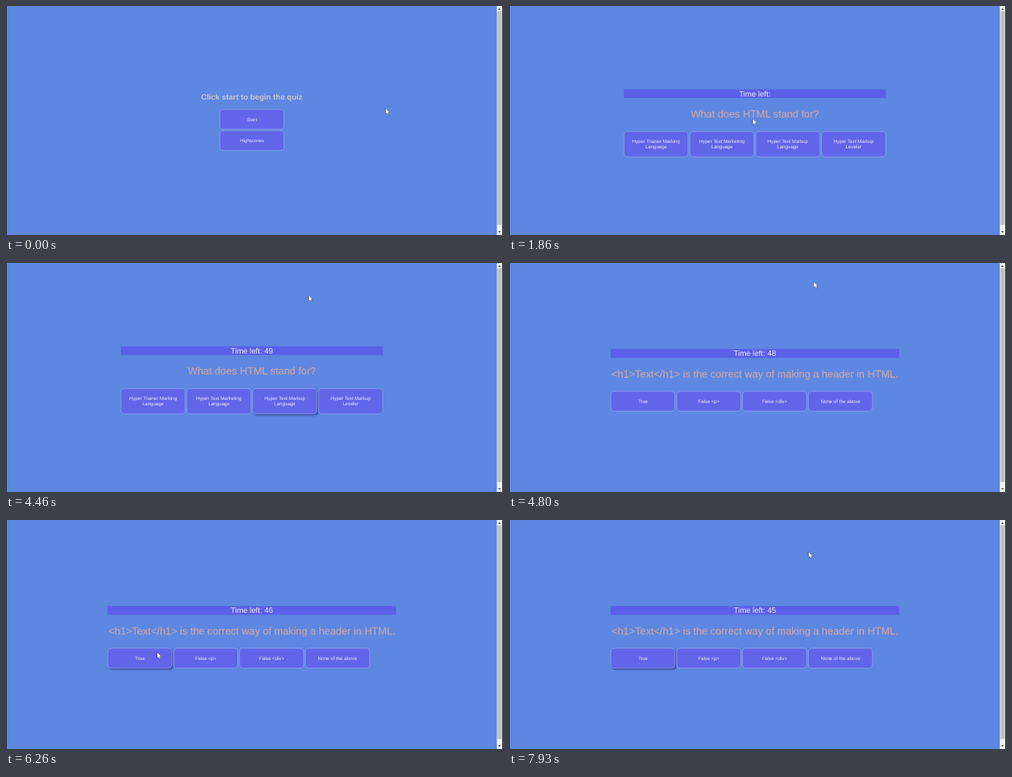
Animation of 640 by 296 pixels, one loop 8 s. Source, as an HTML page with a canvas:

```html
<!DOCTYPE html>
<html lang="en">
<head>
<meta charset="utf-8">
<title>Quiz</title>
<style>
  html, body { margin: 0; overflow: hidden; background: #5d87e0; }
  canvas { display: block; width: 640px; height: 296px; }
</style>
</head>
<body>
<canvas id="stage" width="640" height="296"></canvas>
<script>
const ctx = document.getElementById('stage').getContext('2d');
const LOOP = 8000;
const FONT = '"Liberation Sans", Arial, sans-serif';
const QUESTION_1 = 1860, QUESTION_2 = 4730;

// Pointer moves: start, end, target x, y, optional bend point
const START_POINT = [489, 132.5];
const MOVES = [
  [60, 860, 313.5, 144, 430, 5],
  [930, 1000, 314, 146],
  [2800, 3400, 359, 179],
  [4200, 4460, 390, 42],
  [4700, 4790, 392.5, 24.5],
  [5060, 5860, 203, 158],
  [5860, 6260, 195, 171.5],
  [6330, 6530, 194, 174],
  [7400, 7930, 386, 41.5],
];

// Countdown ticks: time and value shown from then on
const TICKS = [[2860, ' 49'], [4730, ' 48'], [4860, ' 47'], [5860, ' 46'], [6860, ' 45']];

function pointerAt(t) {
  let [x, y] = START_POINT;
  for (const [from, to, tx, ty, bx = (x + tx) / 2, by = (y + ty) / 2] of MOVES) {
    if (t < from) break;
    const u = Math.min(1, (t - from) / (to - from));
    const k = u * u * (3 - 2 * u), m = 1 - k;
    x = m * m * x + 2 * m * k * bx + k * k * tx;
    y = m * m * y + 2 * m * k * by + k * k * ty;
    if (u < 1) break;
  }
  return [x, y];
}

function rect(x, y, w, h, color) {
  ctx.fillStyle = color;
  ctx.fillRect(x, y, w, h);
}

function text(str, x, y, size, color, weight = '') {
  ctx.font = `${weight} ${size}px ${FONT}`;
  ctx.textAlign = 'center';
  ctx.textRendering = 'geometricPrecision';
  ctx.fillStyle = color;
  ctx.fillText(str, x, y);
}

function button(label, x, y, h, active) {
  ctx.save();
  if (active) {
    ctx.shadowColor = 'rgba(35, 35, 110, .8)';
    ctx.shadowOffsetX = ctx.shadowOffsetY = 1.5;
    ctx.shadowBlur = 2.5;
  }
  ctx.beginPath();
  ctx.roundRect(x, y, 82.6, h, 4.2);
  ctx.fillStyle = '#6165e8';
  ctx.fill();
  ctx.restore();
  ctx.strokeStyle = '#93a5ec';
  ctx.lineWidth = 0.8;
  ctx.stroke();
  const lines = label.split('\n');
  lines.forEach((line, i) =>
    text(line, x + 41.3, y + h / 2 + 2.1 + (i - (lines.length - 1) / 2) * 7.4, 6.2, '#f0f0fc'));
}

function question(t, x, y, w, title, labels, h, active) {
  const tick = TICKS.filter(([at]) => t >= at).pop();
  rect(x, y, w, 11.4, '#5c5fe8');
  text('Time left:' + (tick ? tick[1] : ''), 316.5, y + 9.2, 10, '#eeeef8');
  text(title, 316.7, y + 36.8, 13.24, '#c7a3ab');
  ctx.strokeStyle = '#c7a3ab';
  ctx.lineWidth = 0.25;
  ctx.strokeText(title, 316.7, y + 36.8);
  labels.forEach((label, i) =>
    button(label, x + 0.3 + i * 84.8, y + 54.6, h, i === active));
}

function scrollbar() {
  rect(632, 0, 7, 296, '#f0f0f1');
  rect(632.5, 7, 6, 276, '#c1c1c3');
  for (const [base, tip] of [[5, 2.8], [291, 293.2]]) {
    ctx.beginPath();
    ctx.moveTo(633.7, base);
    ctx.lineTo(637.3, base);
    ctx.lineTo(635.5, tip);
    ctx.fillStyle = '#55565a';
    ctx.fill();
  }
  rect(639, 0, 1, 296, '#25282f');
  rect(0, 0, 1, 296, '#202c4c');
}

function pointer(x, y) {
  ctx.save();
  ctx.translate(x, y);
  const arrow = new Path2D('M0 0V6.8L1.6 5.4L2.6 7.8L3.7 7.3L2.7 5.1L4.8 5Z');
  ctx.strokeStyle = '#33384f';
  ctx.lineWidth = 0.9;
  ctx.stroke(arrow);
  ctx.fillStyle = '#fff';
  ctx.fill(arrow);
  ctx.restore();
}

function draw(t) {
  const [x, y] = pointerAt(t);
  rect(0, 0, 640, 296, '#5d87e0');
  if (t < QUESTION_1) {
    text('Click start to begin the quiz', 316.5, 121.3, 10, '#cbc7cd', 'bold');
    button('Start', 275.3, 133.6, 25.6, x < 358 && y > 133);
    button('Highscores', 275.3, 161.2, 25.6, false);
  } else if (t < QUESTION_2) {
    const chosen = t >= 3400 || (x > 317 && y > 162);
    question(t, 147.8, 107.6, 337.6, 'What does HTML stand for?', [
      'Hyper Trainer Marking\nLanguage', 'Hyper Text Marketing\nLanguage',
      'Hyper Text Markup\nLanguage', 'Hyper Text Markup\nLeveler',
    ], 32.8, chosen ? 2 : -1);
  } else {
    question(t, 130.8, 111.2, 371.5,
      '<h1>Text</h1> is the correct way of making a header in HTML.',
      ['True', 'False <p>', 'False <div>', 'None of the above'],
      25.6, t >= 5930 ? 0 : -1);
  }
  scrollbar();
  pointer(x, y);
}

function loop() {
  draw(performance.now() % LOOP);
  requestAnimationFrame(loop);
}
loop();
</script>
</body>
</html>
```
